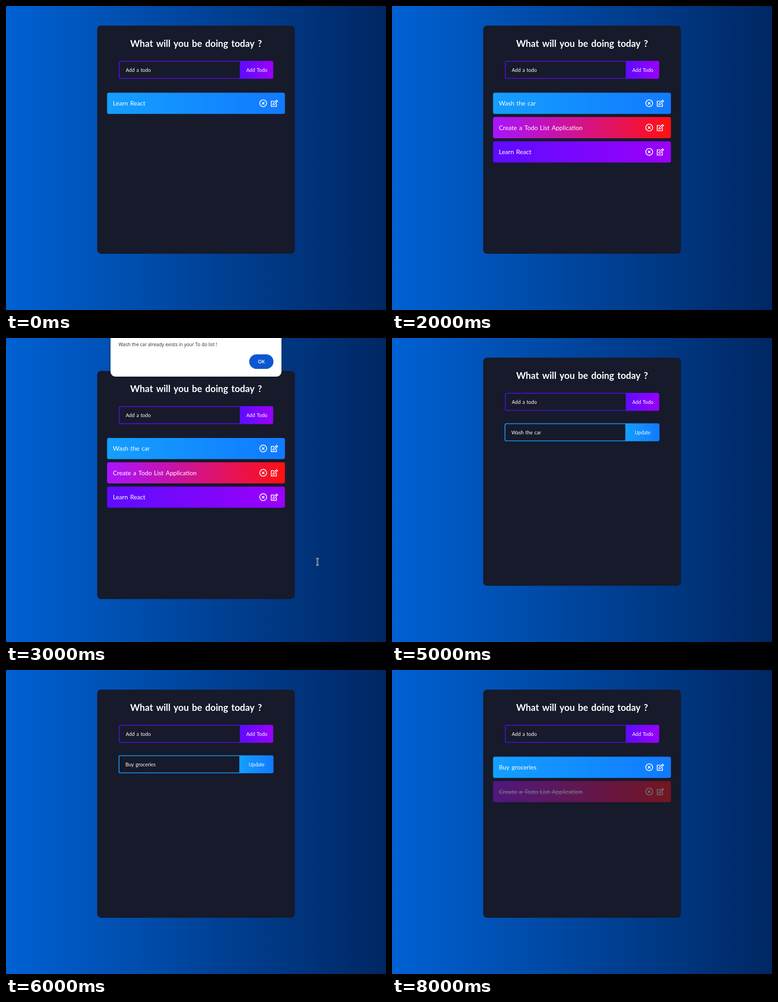
Write an HTML page with a canvas that moves like this. It is 837 px wide and 669 px high and loops after 9000 ms.

```html
<!DOCTYPE html>
<html lang="en">
<head>
<meta charset="utf-8">
<title>Todo list</title>
<style>
  html, body { margin: 0; width: 100%; height: 100%; overflow: hidden; background: #00479d; }
  canvas { display: block; }
</style>
</head>
<body>
<canvas id="stage" width="837" height="669"></canvas>
<script>
const W = 837, H = 669, STEP = 1000;
const ctx = document.getElementById('stage').getContext('2d');
const CARD = '#161a2b';
const SANS = 'Lato, "Open Sans", sans-serif';
const UI = '"Open Sans", "Noto Sans", sans-serif';
const BLUE = ['#149fff', '#117aff'];
const RED = ['#a814ff', '#ff1111'];
const PURPLE = ['#5d0cff', '#9b00fa'];
const ROW_COLORS = [BLUE, RED, PURPLE];

const learn = { text: 'Learn React' };
const create = { text: 'Create a Todo List Application' };
const wash = { text: 'Wash the car' };
const buy = { text: 'Buy groceries' };
const done = { ...create, done: true };

// One scene per second
const scenes = [
  { rows: [learn] },
  { rows: [create, learn] },
  { rows: [wash, create, learn] },
  { rows: [wash, create, learn], alert: true },
  { rows: [wash, create, learn] },
  { edit: 'Wash the car' },
  { edit: 'Buy groceries' },
  { rows: [buy, done, learn] },
  { rows: [buy, done] }
];

function gradient(x, w, [from, to]) {
  const g = ctx.createLinearGradient(x, 0, x + w, 0);
  g.addColorStop(0, from);
  g.addColorStop(1, to);
  return g;
}

function box(x, y, w, h, radius, fill) {
  ctx.beginPath();
  ctx.roundRect(x, y, w, h, radius);
  ctx.fillStyle = fill;
  ctx.fill();
}

function label(text, x, y, font, { color = '#fff', align = 'left', gap = 0 } = {}) {
  ctx.font = font;
  ctx.textAlign = align;
  ctx.wordSpacing = gap + 'px';
  ctx.fillStyle = color;
  ctx.fillText(text, x, y);
  return ctx.measureText(text).width;
}

function lines(...paths) {
  ctx.beginPath();
  for (const [first, ...rest] of paths) {
    ctx.moveTo(...first);
    rest.forEach(p => ctx.lineTo(...p));
  }
  ctx.stroke();
}

function closeIcon(x, y) {
  ctx.beginPath();
  ctx.arc(x, y, 7.6, 0, Math.PI * 2);
  ctx.stroke();
  lines([[x - 2.8, y - 2.8], [x + 2.8, y + 2.8]], [[x + 2.8, y - 2.8], [x - 2.8, y + 2.8]]);
}

function editIcon(x, y) {
  ctx.save();
  ctx.translate(x, y);
  lines([[0, -4.6], [-6.7, -4.6], [-6.7, 6.9], [4.6, 6.9], [4.6, 0.6]]);
  ctx.lineWidth = 1.4;
  lines(
    [[-3.4, 3.8], [-2.6, 0.6], [5, -7.2], [7.5, -4.7], [-0.2, 3], [-3.4, 3.8]],
    [[3, -5.2], [5.5, -2.7]]
  );
  ctx.restore();
}

function row(item, i) {
  const y = 190.8 + i * 53.5, mid = y + 23.3;
  box(222.6, y, 391.8, 46.6, 4, gradient(222.6, 391.8, ROW_COLORS[i]));
  const width = label(item.text, 235.5, mid + 4.9, '13.7px ' + SANS, { gap: 1.2 });
  ctx.strokeStyle = '#fff';
  ctx.lineWidth = 1.7;
  closeIcon(566.5, mid);
  editIcon(591, mid);
  if (item.done) {
    ctx.fillStyle = '#fff';
    ctx.fillRect(235.5, Math.round(mid), width, 1);
    ctx.globalAlpha = 0.6;
    ctx.fillStyle = CARD;
    ctx.fillRect(222, y - 0.5, 393, 47.6);
    ctx.globalAlpha = 1;
  }
}

function field(x, y, w, split, text, button, border, colors) {
  const h = 39.6;
  box(x, y, split - x + 2, h, [4, 0, 0, 4], border);
  box(x + 1.9, y + 1.9, split - x - 2, h - 3.8, [2, 0, 0, 2], CARD);
  box(split, y, x + w - split, h, [0, 4, 4, 0], gradient(split, x + w - split, colors));
  const base = y + 24.1;
  label(text, x + 15, base, '11px ' + SANS, { gap: 1 });
  label(button, (split + x + w) / 2 + 0.6, base, '10.8px ' + SANS, { align: 'center', gap: 1 });
}

function alertBox() {
  ctx.save();
  ctx.shadowColor = 'rgba(0,0,0,.4)';
  ctx.shadowBlur = 6;
  ctx.shadowOffsetY = 1;
  box(230.3, -60, 376.4, 145, 11, '#fff');
  ctx.restore();
  label('Wash the car already exists in your To do list !', 248, 18.3, '10.3px ' + UI, { color: '#2b2b2e' });
  box(535.7, 36, 53.5, 32, 16, '#0b57d0');
  label('OK', 562.5, 55.9, '600 10.5px ' + UI, { align: 'center' });
}

function textCursor(x, y) {
  const beam = [
    [[x - 3, y - 7], [x - 1, y - 7], [x, y - 6], [x, y + 6], [x - 1, y + 7], [x - 3, y + 7]],
    [[x + 3, y - 7], [x + 1, y - 7], [x, y - 6]],
    [[x, y + 6], [x + 1, y + 7], [x + 3, y + 7]]
  ];
  ctx.strokeStyle = '#c9ccd2';
  ctx.lineWidth = 3;
  lines(...beam);
  ctx.strokeStyle = '#15181f';
  ctx.lineWidth = 1;
  lines(...beam);
}

function draw(scene) {
  ctx.fillStyle = gradient(0, W, ['#0061d3', '#002763']);
  ctx.fillRect(0, 0, W, H);

  ctx.save();
  if (scene.alert) ctx.translate(0, 29.2);
  box(200.8, 43.3, 435.4, 502, 8.5, CARD);
  label('What will you be doing today ?', 418.6, 89.6, 'bold 20.3px ' + SANS, { align: 'center', gap: 2 });
  field(248.7, 120.7, 339.8, 515, 'Add a todo', 'Add Todo', '#540edc', PURPLE);
  if (scene.edit) field(247.9, 187.7, 341.3, 514, scene.edit, 'Update', '#1797ee', BLUE);
  else scene.rows.forEach(row);
  ctx.restore();

  if (scene.alert) {
    alertBox();
    textCursor(686, 492.5);
  }
}

const start = performance.now();
function tick() {
  const t = Math.max(0, performance.now() - start);
  draw(scenes[Math.floor(t / STEP) % scenes.length]);
  requestAnimationFrame(tick);
}
tick();
</script>
</body>
</html>
```
